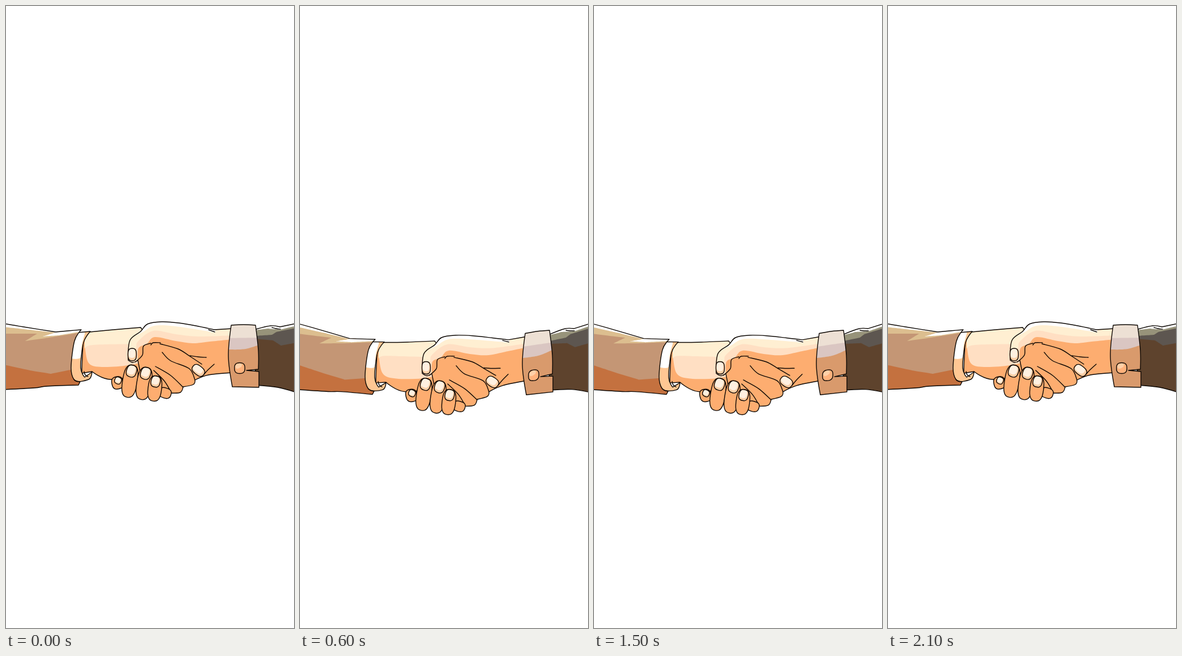
An HTML page with a canvas for the animation above (2.25 s loop, 509 by 1101 pixels).

```html
<!DOCTYPE html>
<html lang="en">
<head>
<meta charset="utf-8">
<title>Handshake</title>
<style>
html, body { margin: 0; width: 100%; height: 100%; overflow: hidden; background: #fff; }
canvas { display: block; }
</style>
</head>
<body>
<canvas id="stage" width="509" height="1101"></canvas>
<script>
const ctx = document.getElementById('stage').getContext('2d');
const WIDTH = 509, HEIGHT = 1101, STEP = 150, STEPS = 15;
const DROPS = [0, 3.7, 8, 13, 24, 27.5, 31];

const SKIN = '#fdad70', PEACH = '#ffdfc3', CREAM = '#ffefd2', INK = '#0c0703';
let drop = 0;

// The arms bend between the fixed outer edges of the stage.
function bend({ x, y, sharp }) {
  const u = Math.min(1, Math.max(0, x / WIDTH));
  return { x, y: y + drop * Math.max(0, Math.sin(Math.PI * u)) ** 1.1, sharp };
}

// Points are written "x,y"; a trailing "!" makes a sharp corner.
const parse = text => text.split(' ').map(item => {
  const [x, y] = item.split(',').map(parseFloat);
  return { x, y, sharp: item.endsWith('!') };
});

function trace(points, closed) {
  const p = points.map(bend), n = p.length, path = new Path2D();
  const at = i => closed ? p[(i + n) % n] : p[Math.min(n - 1, Math.max(0, i))];
  const handle = (i, side) => {
    const a = at(i - 1), b = at(i), c = at(i + 1), k = b.sharp ? 0 : side / 6;
    return [b.x + k * (c.x - a.x), b.y + k * (c.y - a.y)];
  };
  path.moveTo(p[0].x, p[0].y);
  for (let i = 0; i < (closed ? n : n - 1); i++) {
    const end = at(i + 1);
    path.bezierCurveTo(...handle(i, 1), ...handle(i + 1, -1), end.x, end.y);
  }
  if (closed) path.closePath();
  return path;
}

function ink(path) {
  ctx.strokeStyle = INK;
  ctx.lineWidth = 1.4;
  ctx.stroke(path);
}

const line = text => ink(trace(parse(text), false));

function fill(color, points) {
  ctx.fillStyle = color;
  ctx.fill(trace(points, true));
}

// Colours everything above the given edge, for use inside a clipped shape.
function band(color, edge) {
  const points = parse(edge), first = points[0], last = points.at(-1);
  const top = ({ x }) => ({ x, y: 500, sharp: true });
  first.sharp = last.sharp = true;
  fill(color, [top(first), ...points, top(last)]);
}

function shape(color, points, shade) {
  const path = trace(points, true);
  ctx.fillStyle = color;
  ctx.fill(path);
  if (shade) {
    ctx.save();
    ctx.clip(path);
    shade();
    ctx.restore();
  }
  ink(path);
}

// A rounded box, leaning right at the top for a positive tilt.
function pill(x, y, rx, ry, tilt = 0) {
  const soft = v => Math.sign(v) * Math.abs(v) ** 0.75;
  return Array.from({ length: 16 }, (_, i) => {
    const a = i * Math.PI / 8, u = rx * soft(Math.cos(a)), v = ry * soft(Math.sin(a));
    return {
      x: x + u * Math.cos(tilt) - v * Math.sin(tilt),
      y: y + u * Math.sin(tilt) + v * Math.cos(tilt)
    };
  });
}

function nail(x, y, rx, ry, tilt) {
  shape('#ffcfa6', pill(x, y, rx, ry, tilt), () => {
    fill('#fff0e0', pill(x - 0.5, y - ry * 0.2, rx * 0.8, ry * 0.75, tilt));
  });
}

function finger(x, y, rx, ry, tilt) {
  shape(SKIN, pill(x, y, rx, ry, tilt));
  const r = rx * 0.68, up = ry - r * 1.25;
  nail(x + up * Math.sin(tilt), y - up * Math.cos(tilt), r, r * 1.2, tilt * 2);
}

function leftHand() {
  shape(SKIN, parse('138,584 148,577! 190,573 238,569! 260,600! 250,650! 185,661 152,647! 134,650! 135,620'), () => {
    band(PEACH, '130,578 139,588 140,608 147,633 170,639 216,636 250,628');
    band(CREAM, '139,606 147,601 175,599 250,598');
  });
}

function leftArm() {
  shape('#ffc793', parse('127,578! 149,576! 137,596 132,640 139,657! 152,648! 146,661 120,661 110,620'), () => {
    band('#fff', '110,623 131,623 134,600 139,581');
  });
  line('138,647 140,653 145,656');
  shape('#c4713f', parse('-4,562! 31,568 88,577! 110,575 133,573! 121,593 115,640 120,661 131,665! 128,671! 73,673 50,676 -4,679!'), () => {
    band('#c49675', '-4,635! 42,645! 79,651! 119,643! 135,636!');
    band('#dcbe8f', '-4,580! 55,580! 34,593! 76,587! 140,577!');
    band('#fff', '-4,568! 40,573! 88,578! 64,585! 92,583! 140,575!');
    fill('#dcbe8f', parse('40,573! 68,577! 86,578! 64,585!'));
  });
}

function rightArm() {
  shape('#5e432d', parse('442,572! 468,566 484,568! 513,562! 513,684! 480,675 440,671!'), () => {
    band('#5d5650', '440,589! 472,592! 486,601! 513,596!');
    band('#97937a', '440,584! 470,582! 478,577! 513,570!');
    band('#fff', '440,574! 462,571! 484,573! 513,566!');
  });
  line('470,569 477,571 485,572');
}

function rightCuff() {
  shape('#d99a6c', parse('398,565! 420,564 441,565! 446,610 446,643! 425,645! 447,647! 447,675! 400,674! 393,620'), () => {
    band('#dac6c2', '390,608 412,608 428,606 450,599');
    band('#ede0d4', '390,588 450,587');
  });
  shape('#ffb27c', pill(413, 641, 9.2, 9.5), () => fill('#ffd0a8', pill(411, 637, 6, 4, -0.5)));
}

function rightHand() {
  shape(SKIN, parse('216,627! 219,592 238,576 250,563 275,559 305,561 340,567 368,573! 400,571! 400,649! 358,653 334,662! 331,670 313,674! 308,684 291,685! 260,690! 240,662! 233,627! 224,631'), () => {
    band(PEACH, '212,632 231,630 234,606 249,598 263,586 300,593 330,597 360,594 400,590');
    band(CREAM, '212,607 229,606 233,594 260,575 300,581 340,585 400,583');
    band('#fff', '212,590 240,578 262,566 300,567 370,578');
  });
  line('358,573 369,577');
  nail(223, 617, 7.5, 11, 0);

  line('229,630 241,618 243,602 256,597');
  line('256,600 260,596 273,596');
  line('272,598 304,607 325,620 346,634');
  line('325,619 339,621 354,622');
  line('276,613 291,628 324,642 334,662');
  line('264,638 291,654 313,675');
  line('261,645 280,664 292,684');
  line('350,652 357,644 368,634');
  nail(340, 645, 8, 12, -0.9);
}

function knuckles() {
  shape(SKIN, pill(197, 667, 10, 11, -0.2));
  nail(198, 663, 6, 6, 0.4);
  shape(SKIN, pill(281, 685, 11, 9, 0.3));
  finger(219, 664, 13, 29, 0.16);
  finger(244, 668, 13, 29, 0.16);
  finger(263, 677, 12, 22.5, 0.12);
}

function draw() {
  const step = Math.floor(performance.now() / STEP) % STEPS;
  drop = DROPS[Math.min(step, STEPS - 1 - step, DROPS.length - 1)];
  ctx.fillStyle = '#fff';
  ctx.fillRect(0, 0, WIDTH, HEIGHT);
  ctx.lineCap = ctx.lineJoin = 'round';
  [leftHand, leftArm, rightArm, rightHand, rightCuff, knuckles].forEach(part => part());
  requestAnimationFrame(draw);
}
draw();
</script>
</body>
</html>
```
